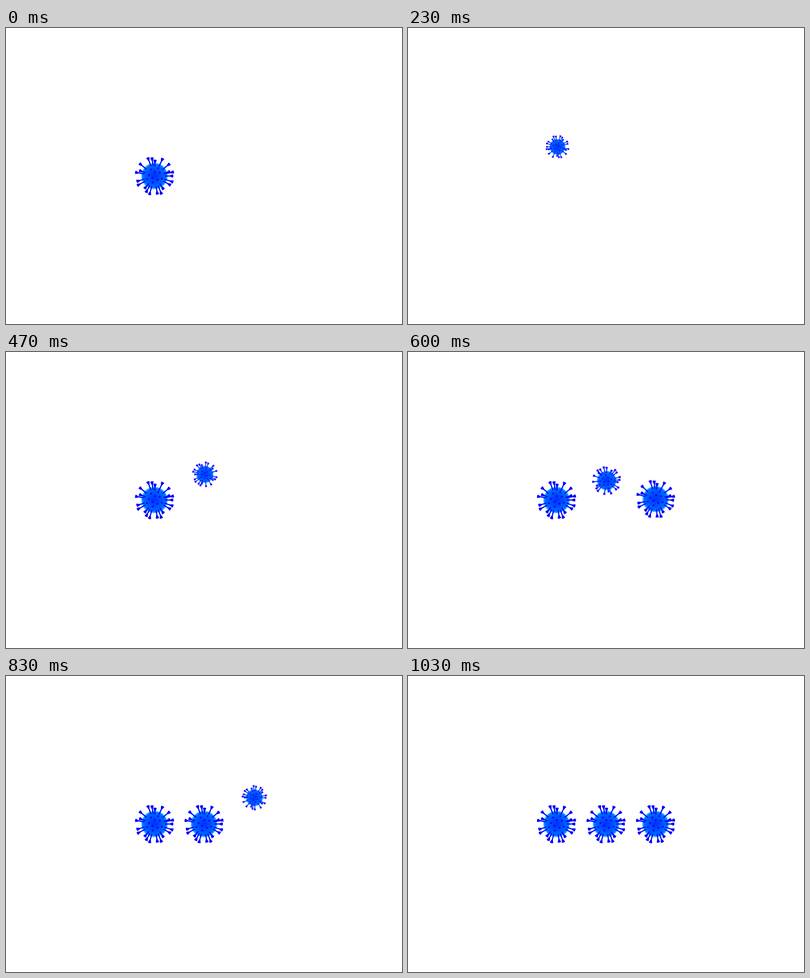
An HTML page that plays this animation: 800 px wide and 600 px high, repeating every 1230 ms.

```html
<!DOCTYPE html>
<html lang="en">
<head>
<meta charset="utf-8">
<title>Virus loader</title>
<style>
  html, body { margin: 0; width: 100%; height: 100%; overflow: hidden; background: #fff; }
  svg { display: block; width: 800px; height: 600px; }
</style>
</head>
<body>
<svg viewBox="0 0 800 600">
  <defs>
    <radialGradient id="skin">
      <stop offset="0" stop-color="#0030ff"/>
      <stop offset=".5" stop-color="#0050ff"/>
      <stop offset=".8" stop-color="#006cff"/>
      <stop offset=".9" stop-color="#00a0ff"/>
      <stop offset="1" stop-color="#80f0ff" stop-opacity="0"/>
    </radialGradient>
    <filter id="soft" x="-60" y="-60" width="120" height="120" filterUnits="userSpaceOnUse">
      <feGaussianBlur stdDeviation=".5"/>
    </filter>
    <g id="virus" filter="url(#soft)">
      <circle r="28" fill="url(#skin)"/>
      <g id="spikes" fill="#0000fa" stroke="#0000fa" stroke-linejoin="round"></g>
    </g>
  </defs>
  <g id="stage"></g>
</svg>
<script>
const LOOP = 1230;
const FRAME = 100 / 3;
const HALF = 7;                 // frames up, then as many down
const STARTS = [0, 8.2, 17];    // in frames
const HEADINGS = [-104, -65, -39, -6, 24, 75, 111, 157, 191, 220];
const NS = 'http://www.w3.org/2000/svg';

function add(parent, tag, attrs) {
  const el = document.createElementNS(NS, tag);
  for (const key in attrs) el.setAttribute(key, attrs[key]);
  return parent.appendChild(el);
}

const spikes = document.getElementById('spikes');

function spike(angle, tip, root) {
  const g = add(spikes, 'g', { transform: `rotate(${angle})` });
  add(g, 'path', { d: `M${root} 0H${tip - 2}`, 'stroke-width': 2.3 });
  add(g, 'path', {
    d: `M${tip - 5} -1.2L${tip} -2.9Q${tip + 1.5} 0 ${tip} 2.9L${tip - 5} 1.2Z`,
    'stroke-width': 1
  });
}

// The outer ring: the first spike and the lower ones stand in pairs
HEADINGS.forEach((angle, i) => {
  const paired = i === 0 || (i > 2 && i < 8);
  const spread = paired ? 6 : 0;
  spike(angle - spread, 39, 21);
  if (paired) spike(angle + spread, 37, 21);
});
// Foreshortened spikes that lean towards the viewer
for (let i = 0; i < 5; i++) spike(-88 + 72 * i, 32, 19);
// Spike heads seen from the front, on a sunflower spiral
for (let i = 1; i < 11; i++) {
  const angle = i * 2.4;
  const r = 5.6 * Math.sqrt(i);
  add(spikes, 'circle', {
    cx: r * Math.cos(angle), cy: r * Math.sin(angle), r: 1.9, stroke: 'none'
  });
}

const stage = document.getElementById('stage');
const viruses = STARTS.map(() => add(stage, 'use', { href: '#virus' }));

// Lift 0..1 and turn in degrees, for a time counted in halves of the hop
function pose(h) {
  if (h <= 0 || h >= 2) return [0, 0];
  if (h < 1) {
    const p = h ** 2;
    return [Math.sin(p * Math.PI / 2), 180 * p];
  }
  const p = (h - 1) ** 1.2;
  return [1 - p, 180 + 180 * p];
}

function draw(time) {
  const frame = Math.floor(time / FRAME + .11);
  viruses.forEach((virus, i) => {
    virus.style.display = frame >= STARTS[i] ? '' : 'none';
    const [lift, turn] = pose((frame - STARTS[i]) / HALF);
    const x = 300 + 100 * i + 2 * lift;
    const y = 300 - 59 * lift;
    virus.setAttribute('transform',
      `translate(${x} ${y}) rotate(${turn}) scale(${1 - .4 * lift})`);
  });
}

const begin = performance.now();
function loop() {
  draw((performance.now() - begin) % LOOP);
  requestAnimationFrame(loop);
}
loop();
</script>
</body>
</html>
```
